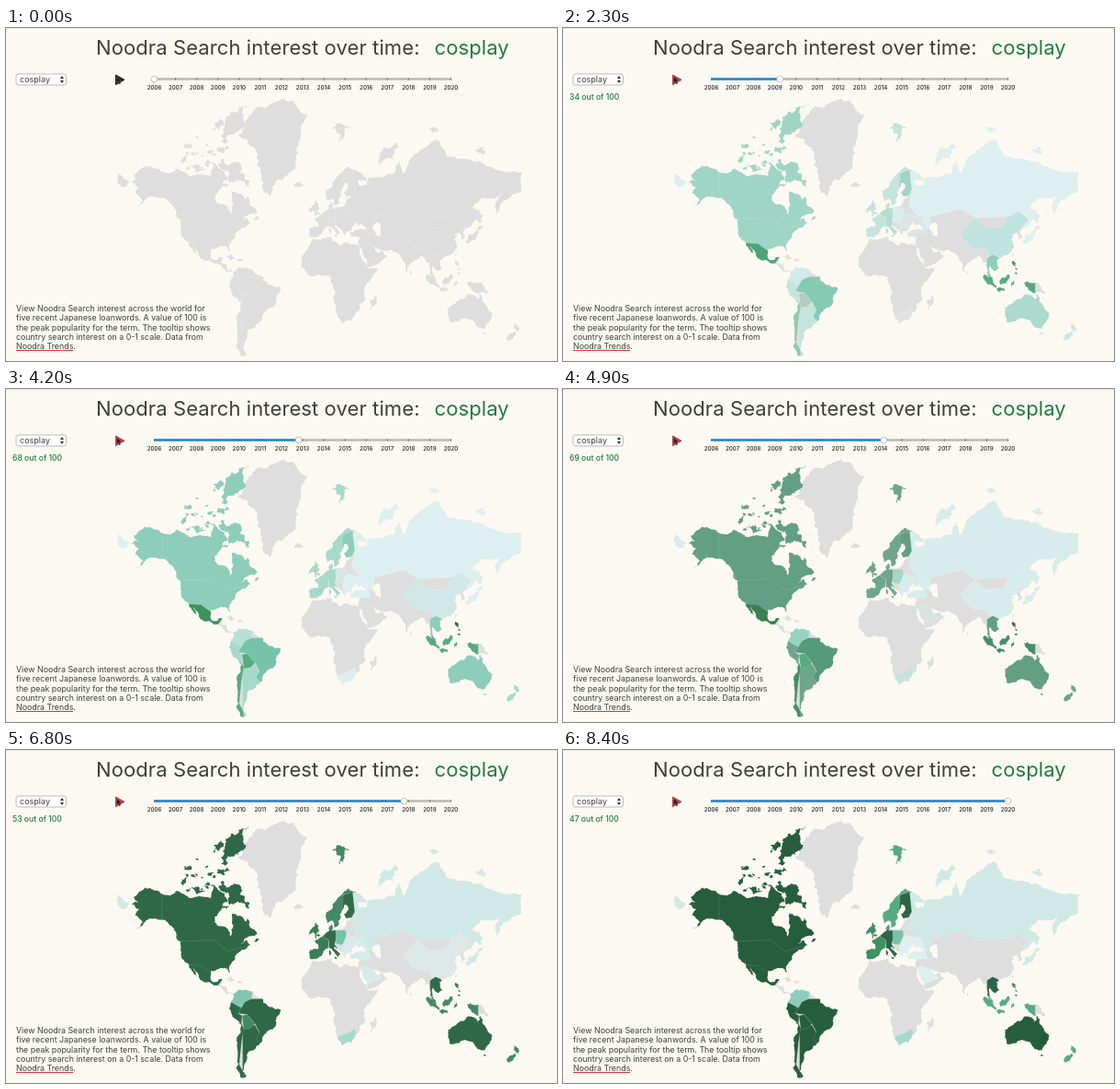
Animation of 600 by 362 pixels, one loop 8500 ms. Source, as an HTML page:

```html
<!DOCTYPE html>
<html lang="en">
<head>
<meta charset="utf-8">
<title>Search interest over time</title>
<style>
  html, body { margin: 0; width: 100%; height: 100%; overflow: hidden; background: #fbf9f2; }
  svg { display: block; font-family: Inter, "Open Sans", sans-serif; fill: #3b403b; }
  .title { font-size: 22px; letter-spacing: .1px; }
  .note { font-size: 8.85px; }
  .year { font-size: 6.2px; font-weight: 500; fill: #222; text-anchor: middle; }
  .green { fill: #217a45; }
  #value { font-size: 8.6px; font-weight: 500; }
</style>
</head>
<body>
<svg width="600" height="362" viewBox="0 0 600 362">
  <path d="M0 .5H600" stroke="#e9e7e0"/>
  <clipPath id="coast"></clipPath>
  <g id="land" fill="#dedede"></g>
  <g id="countries" clip-path="url(#coast)" stroke="#fff" stroke-opacity=".3" stroke-width=".4"></g>
  <g id="cover"></g>

  <text class="title" x="98" y="29">Noodra Search interest over time:</text>
  <text class="title green" x="466.5" y="29">cosplay</text>

  <rect x="11" y="50" width="54.5" height="12" rx="2.5" fill="#fff" stroke="#aaa" stroke-width=".8"/>
  <text x="15" y="59.2" font-size="9">cosplay</text>
  <path d="M59 55l2-3 2 3zM59 57l2 3 2-3z" fill="#333"/>

  <path id="play" d="M119.5 51l9.5 5.3-9.5 5.4z"/>
  <path d="M120.5 52.5v7.2l1.7-1.5 1.2 2.9 1.5-.7-1.2-2.7h2.3z" fill="#222" stroke="#888" stroke-width=".3"/>
  <text id="value" class="green" x="7" y="77.5"></text>

  <path d="M161.5 55.5H484.5" stroke="#b9b8b3" stroke-width="2.6"/>
  <path id="progress" stroke="#2387d3" stroke-width="2.6"/>
  <g id="years"></g>
  <circle id="knob" cy="55.5" r="3.4" fill="#fff" stroke="#aaa" stroke-width=".7"/>

  <g class="note">
    <text x="11" y="308">View Noodra Search interest across the world for</text>
    <text x="11" y="318.4">five recent Japanese loanwords. A value of 100 is</text>
    <text x="11" y="328.8">the peak popularity for the term. The tooltip shows</text>
    <text x="11" y="339.2">country search interest on a 0-1 scale. Data from</text>
    <text x="11" y="349.4">Noodra Trends.</text>
  </g>
  <path d="M11 350.5H73" stroke="#e0343c"/>
</svg>
<script>
// Key points of the coasts as "lon lat" pairs; ragged() adds the detail.
const LAND = {
  northAmerica: `-168 66 -162 66.5 -166 68.4 -156 71.3 -136 69 -128 70.3 -115 68 -97 68 -94 72 -85 69.5 -82 67 -87 66
    -87 64.5 -94 61 -94 58.5 -88 56.5 -82 55 -80 51.3 -79 54.5 -77 57 -78 62.4 -70 61 -66 58.8 -64.5 60.3 -60 55.2
    -56 52.5 -66.5 50.2 -71 47 -65 49 -61 46 -66 43.6 -70 43 -74 40.6 -76 36 -81 31.5 -80.3 25.5 -83 29.5 -90 29.5
    -97 28 -97.5 21 -95 18.5 -91 18.7 -90 21 -87 21 -88.5 16 -83.5 15 -83 10 -77.5 8.5 -83.5 8.5 -87.5 13 -95 16
    -105 20 -109 26 -113 31 -109.5 23.5 -117 33 -124 40 -124 48 -130 54.5 -138 59.5 -150 60 -164 54.7 -158 58.5
    -165 61.5 -161 64`,
  southAmerica: `-77.5 8.5 -72 12 -62 10.6 -51 4 -50 0 -35 -6 -39 -13 -40 -21 -48 -26 -53 -33.5 -57 -36 -62 -39 -65 -43
    -67 -47 -69 -52 -66 -55 -71 -55 -75 -50 -73.5 -37 -70.3 -19 -76 -14 -81 -5 -80 0 -77.5 4`,
  africa: `-6 35.8 10.5 37 11 33.5 19 30.5 21 32.8 34 31 37 20 43 11.6 51 11.8 42 -1 39 -6 40.5 -15 35 -20 35 -25
    28 -33 19 -34.8 12 -17 13.5 -11 9 0 9 4.5 -8 4.5 -16.5 13 -16 22 -10 30`,
  europe: `60 68 44 66.5 41 64.5 36 64.5 33 66.6 41 66.5 41 67.5 25 71 14 67 10.5 64 5 61.5 6 58.2 10.7 59.3 13 55.6
    16.5 57 18.5 60.5 17.5 62 22 65.8 25 65 21.5 62 23 60 30 60 24 59 21 55.5 10.5 54 10 57.5 8 56 8.5 54 2 51
    -4.7 48.4 -1.5 46 -1.7 43.4 -9 43 -9 37 -2 36.8 3 42 9 44 16 38 18 40 12.5 45 19.5 41.5 22.8 36.6 23 40 28 41
    28 43 31 46.5 34 44.5 39 47 37.5 44.8 41.5 41.7 48 43 60 55`,
  southAsia: `41.5 41.7 31 41.3 26.5 40 28 36.7 36 36.5 34.5 29 43 12.7 52 15.6 59.8 22.5 56 26 51.5 24.5 48 30 51 28
    57 26.5 67 25 72.8 20.5 77.5 8 80 15 90 22.3 94.3 16 97.5 16.7 98.3 8 103.5 1.4 100 9 100 13.4 105 9 109 12
    106 19 110 21 117 23.5 122 30 119.5 35 122 37 118 39 124 40 126.5 34.5 129.3 36 127.5 39.5 131 43 120 52 80 55 48 50`,
  siberia: `131 43 140 48.5 141 53 135 54.7 143 59.3 155 59.3 163 62 156.5 57.5 157 51 163 58 179 62.5 180 69 160 69.7
    140 72.5 113 73.8 104 77.5 80 73 74 68.5 70 72.8 67 69 44 67.5 40 55 48 43 80 42 120 46`,
  chukotka: "-180 69 -170 66 -173 64.3 -180 65.3",
  australia: `114 -23 115.5 -34 124 -33.5 131 -31.5 138 -35 141 -38 147 -38.8 151 -34 153 -27 146 -19 142.5 -11
    140.5 -17.5 136 -12.2 131 -12 129 -15 122 -18`,
};
const GREENLAND = "-73 78.3 -60 82 -32 83.6 -12 81.5 -19 77 -22 72 -25 69.5 -40 65 -44 60 -51.5 64 -53 70 -58 75.5";
const CASPIAN = "47 45 53 46 54 37.2 50 38";

// Islands are lens shapes, given by their two tips.
const ISLANDS = {
  arctic: `-88 73 -64 64 / -117 71 -102 70 / -125 72 -118 74 / -88 77 -64 82.8 / -96 79 -88 81 / -92 75 -80 75.5
    / -87 64 -81 65 / 52 71 68 76.8 / 96 79.5 105 79 / 138 75.5 150 75.2 / 11 79.5 27 79.5 / 17 77 19 80`,
  atlantic: `-59 48 -54 50 / -84.5 22 -74.5 20 / -74 19 -68.5 18.5 / -23.5 65 -14 65 / -4 50 -4 58.5 / -4 51.5 1.5 52
    / -10 52 -6 55 / 49.5 -12 45 -25 / 12.5 38 15.5 37 / 9 39 9 43`,
  pacific: `142.5 54 142.8 46 / 140 42 145 44 / 130 32 141 41 / 120.5 18 124 13 / 122 7 126 7 / 123 12 125 10
    / 95 5.6 106 -5.8 / 105 -6.7 114 -8.2 / 110 -3 117.5 6.5 / 110 1 117 -2 / 120 -5 122 1 / 131 -1 150 -10
    / 145 -41 148 -43 / 173 -35 177 -41 / 174 -41 167 -46.5 / 121.5 25 120.8 22 / 80.5 9.5 81 6 / -128 50.7 -123.5 48.4`,
};

// Interest levels (hex digits) at TIMES, then rough borders; the coast clips the sea side.
const COUNTRIES = {
  usa: ["459b", "-180 72 -50 72 -50 24 -97 24 -118 25 -180 15"],
  mexico: ["789b", "-117 32.5 -106 31.8 -97 26 -86 22 -92 14.5 -120 14"],
  canada: ["459b", "-141 85 -141 60 -130 55 -125 48.3 -95 49 -82 42 -67 45 -50 43 -50 85"],
  argentina: ["249b", "-69 -22 -58 -19 -53 -27 -53 -34 -60 -56 -69 -56"],
  brazil: ["569b", "-64 4 -51 4 -34 0 -34 -10 -48 -34 -53 -34 -57 -30 -54 -25 -58 -18 -65 -10 -73 -9 -69 1"],
  chile: ["479b", "-70 -17.5 -68 -22 -70 -33 -72 -48 -68.5 -52 -68 -56 -80 -56 -75 -17"],
  bolivia: ["077b", "-69.5 -11 -65 -10 -58 -18 -62 -22 -68 -22.8"],
  peru: ["249b", "-79 1 -70 -4 -73 -9 -69.5 -11 -70 -18 -83 -8"],
  colombia: ["1365", "-78 9 -72 13 -60 11 -61 4 -67 1 -70 -4 -79 1"],
  russia: ["1122", `32 72 29 68 31 62 28 56 33 52 40 49 38 44 48 42 48 50 61 52 75 54 88 49 117 50 126 53 131 43
    129.7 32 142 34 181 50 181 83 35 83 / -181 72 -169 72 -169 62 -181 62`],
  china: ["3210", "74 39 87 49 97 42.5 112 43.5 117 49.7 126 53 135 48 125 40 123 30 117 22 109 17 100 22 98 28 86 28 78 34"],
  indochina: ["559a", "98 20 103 23 108 21 110 12 105 8 98 6 98 13"],
  archipelago: ["7797", "95 6.5 105 5 118 8 126 3 141 -1 141 -12 105 -12 94 4"],
  philippines: ["7a98", "119 20 124 20 128 6 120 5 117 8"],
  australia: ["359b", "110 -10 155 -10.6 160 -45 110 -45"],
  newZealand: ["1497", "165 -33 180 -33 180 -48 165 -48"],
  nordic: ["2497", "3 55 13 54.8 19 58 19 62 24 66 20 69 32 70 32 72 3 72 / 9 82 30 82 30 76 9 76"],
  finland: ["459a", "20.5 69 19.5 60 28 60.5 31 63 29 70"],
  westEurope: ["2498", "-11 60 0 60 2.5 51.2 8 49 7 43 3 39 -6 36 -11 36.5"],
  midEurope: ["349a", "2.5 51.2 9 55 14.3 54.2 15 51 13 46.5 19 40 15 36 8 38.5 8 49"],
  poland: ["1266", "14 54.5 23 54.5 24 50 20 46 14 47"],
  blackSea: ["0121", "24 52 40 50 45 37 27 36 20 40 20 46"],
  arabia: ["0021", "35 29 39 32 48 29 55 22 43 17 38 21"],
  southAfrica: ["0144", "16 -28.5 25 -25.5 31 -22 33 -28 28 -35 17 -36"],
};
const RAMP = ["dedede", "deeff0", "d1e9e6", "b9e0d8", "a7d9ca", "8dcdb9", "76c3aa", "58aa82", "3f9160", "36704e", "2d6544", "265e3d"]
  .map(hex => [0, 2, 4].map(i => parseInt(hex.slice(i, i + 2), 16)));

const LOOP = 8500, START = 500, END = 7950;
const TIMES = [1400, 4200, 5600, 8400];
const COUNT_TIMES = [1400, 3100, 4200, 5600, 6800, 8400];
const COUNTS = [28, 39, 68, 70, 53, 47];

const $ = id => document.getElementById(id);
function add(parent, tag, attrs) {
  const el = document.createElementNS("http://www.w3.org/2000/svg", tag);
  for (const key in attrs) el.setAttribute(key, attrs[key]);
  return parent.appendChild(el);
}

let seed = 7;
const random = () => (seed = seed * 16807 % 2147483647) / 2147483647;

// Mercator projection
const project = (lon, lat) => [122 + (lon + 180) * 1.222, 275.3 - 69.7 * Math.asinh(Math.tan(lat * Math.PI / 180))];

function parse(text) {
  return text.split("/").map(part => {
    const n = part.trim().split(/\s+/).map(Number);
    return n.flatMap((v, i) => i % 2 ? [] : [project(v, n[i + 1])]);
  });
}

// Splits an edge at displaced midpoints to make a ragged coast.
function ragged([ax, ay], [bx, by], amount) {
  const dx = bx - ax, dy = by - ay, length = Math.hypot(dx, dy);
  if (length < 2.5) return [[bx, by]];
  const k = (random() - .5) * amount * Math.min(1, 9 / length);
  const mid = [(ax + bx) / 2 - dy * k, (ay + by) / 2 + dx * k];
  return [...ragged([ax, ay], mid, amount), ...ragged(mid, [bx, by], amount)];
}

function outline(points, amount) {
  if (amount) points = points.flatMap((p, i) => ragged(p, points[(i + 1) % points.length], amount));
  return "M" + points.map(p => p.map(v => v.toFixed(1)).join(" ")).join("L") + "Z";
}

function lens([a, b]) {
  const x = (a[0] + b[0]) / 2, y = (a[1] + b[1]) / 2;
  const nx = (b[1] - a[1]) * .23, ny = (a[0] - b[0]) * .23;
  return [a, [x + nx, y + ny], b, [x - nx, y - ny]];
}

function addLand(d) {
  add($("coast"), "path", { d });
  add($("land"), "path", { d });
}

function keyed(times, values, t) {
  let i = 0;
  while (i < times.length - 2 && t > times[i + 1]) i++;
  const k = Math.min(1, Math.max(0, (t - times[i]) / (times[i + 1] - times[i])));
  return values[i] + (values[i + 1] - values[i]) * k;
}

for (const text of Object.values(LAND)) addLand(outline(parse(text)[0], .4));
for (const [sea, text] of Object.entries(ISLANDS))
  for (const tips of parse(text)) addLand(outline(lens(tips), sea === "arctic" ? .9 : .5));

// Small islands scattered over the Canadian Arctic
for (let i = 0; i < 18; i++) {
  const a = project(-122 + random() * 36, 70 + random() * 8);
  const b = [a[0] + 3 + random() * 6, a[1] + random() * 8 - 4];
  addLand(outline(lens([a, b]), .9));
}
add($("cover"), "path", { d: outline(parse(GREENLAND)[0], .6), fill: "#dedede" });
add($("cover"), "path", { d: outline(parse(CASPIAN)[0], .4), fill: "#fbf9f2" });

const shapes = Object.values(COUNTRIES).map(([digits, border]) => {
  const colours = [...digits].map(c => RAMP[parseInt(c, 16)]);
  return {
    path: add($("countries"), "path", { d: parse(border).map(p => outline(p)).join("") }),
    channels: [0, 1, 2].map(i => colours.map(c => c[i])),
  };
});

for (let i = 0; i <= 14; i++) {
  const x = 161.5 + i * 323 / 14;
  add($("years"), "path", { d: `M${x} 54.2v2.6`, stroke: "#777" });
  add($("years"), "text", { class: "year", x, y: 67.2 }).textContent = 2006 + i;
}

function draw(now) {
  const t = Math.floor(now % LOOP / 100) * 100;
  const playing = t >= START, hover = t >= 200;
  for (const { path, channels } of shapes) {
    const rgb = playing ? channels.map(c => Math.round(keyed(TIMES, c, t))) : RAMP[0];
    path.setAttribute("fill", `rgb(${rgb})`);
  }
  const progress = Math.min(1, Math.max(0, (t - START) / (END - START)));
  const x = 161.5 + 323 * progress ** 1.03;
  $("knob").setAttribute("cx", x);
  $("progress").setAttribute("d", `M161.5 55.5H${x}`);
  $("play").setAttribute("fill", hover ? "#d9363e" : "#222");
  $("play").setAttribute("stroke", hover ? "#b8434a" : "#222");
  $("value").textContent = playing ? Math.round(keyed(COUNT_TIMES, COUNTS, t)) + " out of 100" : "";
  requestAnimationFrame(() => draw(performance.now()));
}
draw(0);
</script>
</body>
</html>
```
